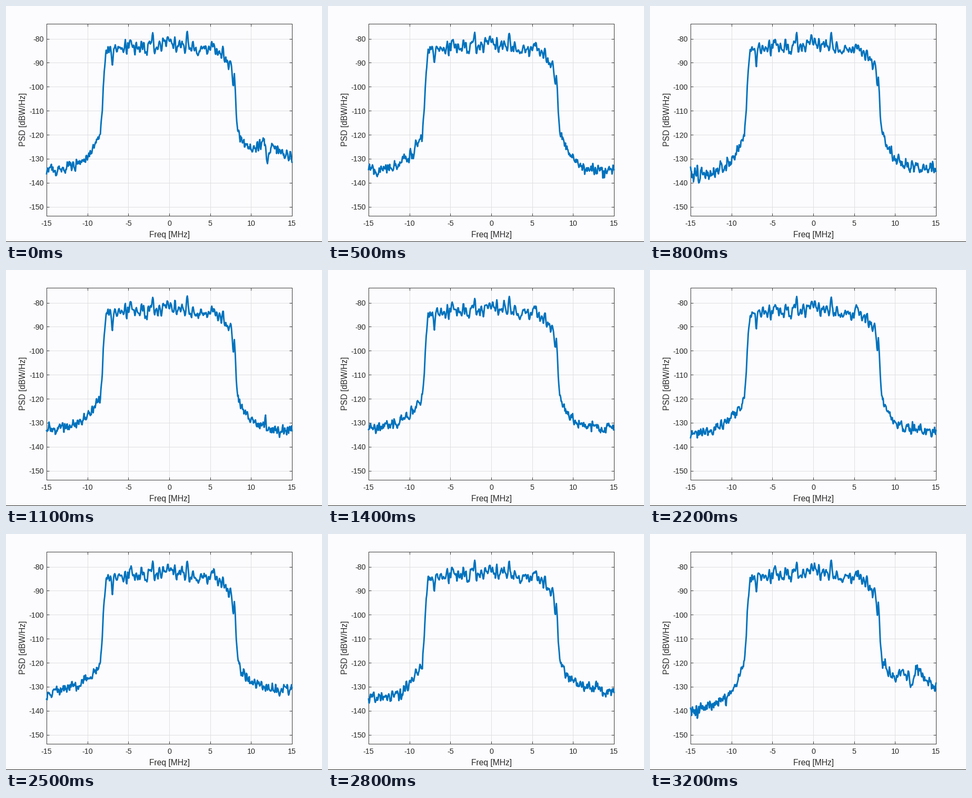
These frames come from a looping animation (600x451 px, 3300 ms). A matplotlib script:

```python
import numpy as np
import matplotlib.pyplot as plt
from matplotlib.animation import FuncAnimation
from matplotlib.lines import Line2D

W, H, DPI = 600, 451, 100
FRAMES, STEP = 33, 100
LEFT, RIGHT, TOP, BOTTOM = 77.1, 543, 34.1, 401.1
BLUE, INK, EDGE = "#0072BD", "#262626", "#3A3A3A"
PAPER, GRID = "#FCFCFE", "#DFDFE1"

FREQ = np.linspace(-15, 15, 512)
DIST = np.abs(FREQ)
CORNER, SHOULDER = 8.42, -119.5

# Half of the symmetric band outline: MHz and dBW/Hz
BAND_X = [0, 4, 6.5, 7.5, 7.95, 8.08, 8.2, CORNER]
BAND_Y = [-82.8, -83.8, -85, -88, -94, -101, -111, SHOULDER]

# Noise floor far from the band, at a few time steps
KEY = [0, 5, 8, 11, 17, 22, 25, 32]
FLOOR_L = [-135.5, -135.3, -138, -133, -131.7, -134.5, -131.8, -140]
FLOOR_R = [-131, -135, -134, -133.3, -132, -134, -131.5, -131]


def noise(rng, kernel, sd):
    kernel = np.array(kernel) / np.linalg.norm(kernel)
    return sd * np.convolve(rng.normal(size=FREQ.size), kernel, "same")


def bell(center, width):
    return np.exp(-((FREQ - center) / width) ** 2)


RIPPLE = noise(np.random.default_rng(4), [1, 2, 2, 1], 1.9)
OUTLINE = np.interp(DIST, BAND_X, BAND_Y) - 0.1 * FREQ


def spectrum(i):
    rng = np.random.default_rng(100 + i)
    lower = FREQ < 0
    floor = np.where(lower, np.interp(i, KEY, FLOOR_L),
                     np.interp(i, KEY, FLOOR_R))
    reach = np.where(lower, 1.8, 1.35)
    skirt = floor + (SHOULDER - floor) * np.exp((CORNER - DIST) / reach)

    # Neighbouring channel, seen only around the loop point
    neighbour = max(0, 1 - min(i, FRAMES - 1 - i) / 3)
    skirt += neighbour * (6.5 * bell(12.2, 2) - 7 * bell(12, 0.25))

    rough = 1.2 + 0.12 * np.clip(-135 - skirt, 0, 4)
    skirt += noise(rng, [1, 3, 1], rough)
    ripple = np.where(DIST < 7.9, RIPPLE, 0) + noise(rng, [1, 2, 1], 0.5)
    return np.where(DIST < CORNER, OUTLINE + ripple, skirt)


def pt(px):
    return px * 72 / DPI


plt.rcParams.update({"font.family": "Liberation Sans",
                     "axes.unicode_minus": False})
fig = plt.figure(figsize=(W / DPI, H / DPI), dpi=DPI, facecolor=PAPER)
ax = fig.add_axes([LEFT / W, 1 - BOTTOM / H,
                   (RIGHT - LEFT) / W, (BOTTOM - TOP) / H], facecolor=PAPER)
ax.set(xlim=(-15, 15), ylim=(-153.8, -73.8),
       xticks=range(-15, 16, 5), yticks=range(-150, -79, 10))
ax.set_axisbelow(True)
ax.grid(color=GRID, linewidth=pt(1))
ax.tick_params(direction="in", top=True, right=True, length=pt(5),
               width=pt(1), color=EDGE, labelcolor=INK, labelsize=pt(14.2))
ax.tick_params(axis="x", pad=pt(8.4))
ax.tick_params(axis="y", pad=pt(5.6))
for spine in ax.spines.values():
    spine.set(color=EDGE, linewidth=pt(1))

label = dict(ha="center", va="baseline", color=INK, fontsize=pt(15.6))
fig.text(310.5 / W, 1 - 442 / H, "Freq [MHz]", **label)
fig.text(37.3 / W, 1 - 216.5 / H, "PSD [dBW/Hz]", rotation=90,
         rotation_mode="anchor", **label)
fig.add_artist(Line2D([0, 1], [1 / H] * 2, color=INK, linewidth=pt(1)))

trace, = ax.plot(FREQ, spectrum(0), color=BLUE, linewidth=pt(2.9),
                 solid_joinstyle="round", clip_on=False, zorder=5)


def update(i):
    trace.set_ydata(spectrum(i))
    return trace,


anim = FuncAnimation(fig, update, frames=FRAMES, interval=STEP,
                     repeat=True, repeat_delay=0)
plt.show()
```
